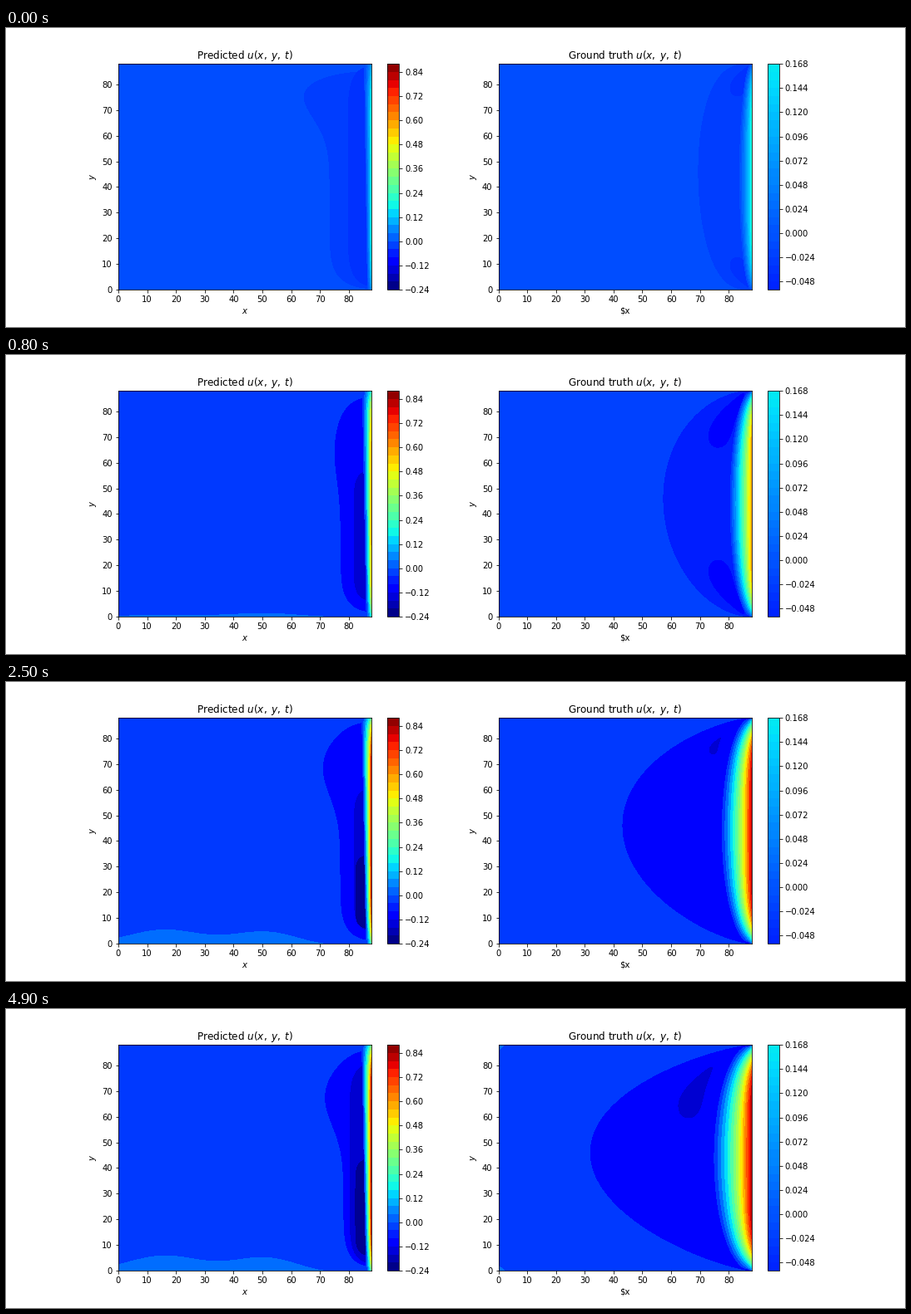
Recreate the animation shown at these times as a matplotlib script. Size 1080 by 360 pixels, loop 5000 ms.

```python
import matplotlib.pyplot as plt
import numpy as np
from matplotlib.animation import FuncAnimation
from matplotlib.colors import Normalize

FRAMES, INTERVAL = 50, 100
SIZE = 88
CMAP = plt.get_cmap("jet")
NORM = Normalize(-0.23, 0.88)
NICE_STEPS = (0.01, 0.015, 0.02, 0.03, 0.04, 0.06)

plt.rcParams["figure.subplot.bottom"] = 0.125
plt.rcParams["font.size"] = 10

# Key poses by time in ms.
# Pockets: bottom, top, width, then height and centre of a bulge.
OUTER = {0: (0.5, 85, 14.5, 11.5, 80), 500: (2.4, 85.5, 10.6, 1, 62),
         1200: (1.5, 85.3, 10.8, 3.6, 68), 2500: (1.5, 86.3, 10.8, 6.1, 69),
         3200: (1.5, 86.3, 10.8, 6.1, 69), 4000: (1.8, 85.8, 9.7, 6.5, 68)}
MIDDLE = {0: (1.5, 87, 8.2), 500: (5.5, 66, 6.3), 1200: (7.4, 45, 5.9),
          2500: (5.2, 60.5, 6.1), 3200: (5.2, 60.5, 6.1), 4000: (2.9, 80.6, 7.6)}
CORE = {1200: (6, 30, 0), 2500: (5.8, 34.6, 5.5), 4000: (5.8, 43.7, 5.6)}
HUMPS = {0: (0, 0), 1200: (0.8, 2), 2500: (5.3, 4.9), 4900: (5.7, 5.4)}
# Leaves: tip, tail, half width.
LENS = {0: (87, 87, 83, 75.5, 2.3), 500: (85, 87, 79, 73.5, 2.65),
        1200: (85.5, 87, 72.5, 56, 4.7)}
SPOT = {900: (79, 80, 79, 80, 0), 1200: (82, 85, 77.2, 75, 1.9),
        2500: (77, 80, 74.5, 74, 1.2), 4900: (74, 79.3, 66, 59.6, 3.6)}
BOWL_TIP = {0: 69.5, 500: 64, 1200: 48.5, 2500: 43.2, 4900: 32}

X, Y = np.meshgrid(np.linspace(66, SIZE, 89), np.linspace(0, SIZE, 89))
ETA = np.abs(Y / 44 - 1)


def blend(keys, t):
    """Linear interpolation between keyed values."""
    vals = np.transpose(list(keys.values()))
    if vals.ndim == 1:
        return np.interp(t, list(keys), vals)
    return [np.interp(t, list(keys), v) for v in vals]


def band_step(span):
    """Smallest round step that covers the span in 21 bands."""
    return next((s for s in NICE_STEPS if s >= span / 21), NICE_STEPS[-1])


def pocket(bottom, top, width, bulge=0, centre=44):
    """Region leaning on the right wall, rounded at both ends."""
    e = -np.cos(np.linspace(0, np.pi, 80))
    y = bottom + (top - bottom) * (e + 1) / 2
    w = width + bulge * np.exp(-(((y - centre) / 16) ** 2))
    return SIZE - w * np.sqrt(1 - e**8), y


def leaf(tip_x, tip_y, tail_x, tail_y, half):
    """Drop from tip to tail, bowed to the left."""
    a = np.linspace(0, 2 * np.pi, 60)
    k = (1 - np.cos(a)) / 2
    x = tip_x + (tail_x - tip_x) * k
    x += half * (np.sin(a) * (0.5 + k) - 0.6 * np.sin(np.pi * k))
    return x, tip_y + (tail_y - tip_y) * k


def bowl(tip, power):
    e = np.cos(np.linspace(0, np.pi, 120))
    return SIZE - (SIZE - tip) * (1 - e**2) ** power, 44 + 44 * e + 2 * (1 - e**2)


def ripple(first, second):
    x = np.linspace(0, 71, 80)
    y = first * np.exp(-(((x - 16) / 17) ** 2))
    y += second * np.exp(-(((x - 52) / 17) ** 2))
    return np.append(x, 0), np.append(y * (1 - (x / 71) ** 8), 0)


def region(ax, xy, value):
    artists.extend(ax.fill(*xy, color=CMAP(NORM(value)), lw=0,
                           antialiased=False, zorder=1))


def wall_layer(ax, depth, wall, step):
    """Bands rising from -step at the inner edge to the wall value."""
    s = 1 - (SIZE - X) / np.maximum(depth, 0.3)
    u = -step + (wall + step) * (0.7 * s + 0.3 * np.maximum(s, 0) ** 3)
    levels = step * np.arange(-1, np.ceil(wall.max() / step) + 2)
    artists.append(ax.contourf(X, Y, u, levels=levels, cmap=CMAP, norm=NORM,
                               zorder=1.5))


def draw_predicted(ax, t, speed):
    step = band_step(1.5 * speed)
    ax.set_facecolor(CMAP(NORM(-step / 2)))
    region(ax, ripple(*blend(HUMPS, t)), step / 2)
    for i, keys in enumerate((OUTER, MIDDLE, CORE)):
        region(ax, pocket(*blend(keys, t)), -(i + 1.5) * step)
    depth = (1 - 0.25 * np.exp(-t / 500)) * (1.9 + 1.5 * Y / SIZE)
    wall_layer(ax, depth, speed * (1 - 0.65 * ETA**6), step)


def draw_truth(ax, t, speed):
    step = band_step(1.2 * speed)
    ax.set_facecolor(CMAP(NORM(-step / 2)))
    power = 0.78 - 0.43 * np.exp(-t / 1500)
    region(ax, bowl(blend(BOWL_TIP, t), power), -1.5 * step)
    if step < NICE_STEPS[-1]:
        x, y = leaf(*blend(LENS, t))
        region(ax, (x, y), -2.5 * step)
        region(ax, (x, SIZE - y), -2.5 * step)
    region(ax, leaf(*blend(SPOT, t)), -0.12 - step / 2)
    n = max(0, 0.0007 * (t - 2000))
    region(ax, ([0, n, 0], [0, 0, n]), step / 2)
    region(ax, ([0, n, 0], [SIZE, SIZE, SIZE - n]), step / 2)
    depth = 4.2 + 8.8 * (t / 4900) ** 0.55
    wall_layer(ax, depth * np.sqrt(1 - ETA**2), speed * (1 - ETA**6), step)


def setup(ax, title, xlabel, levels, ticks):
    bands = ax.contourf([[levels[0], levels[-1]]] * 2, levels=levels,
                        cmap=CMAP, norm=NORM)
    fig.colorbar(bands, ax=ax, ticks=ticks)
    bands.set_visible(False)
    ax.set(title=title, xlabel=xlabel, ylabel="$y$",
           xlim=(0, SIZE), ylim=(0, SIZE))
    ax.set_autoscale_on(False)


def update(i):
    while artists:
        artists.pop().remove()
    t = i * INTERVAL
    speed = 0.84 - 0.65 * np.exp(-t / 850)
    draw_predicted(left, t, speed)
    draw_truth(right, t, speed)
    return []


artists = []
fig, (left, right) = plt.subplots(1, 2, figsize=(15, 5), dpi=72)
p_levels = np.round(-0.24 + 0.04 * np.arange(29), 3)
t_levels = np.round(-0.056 + 0.008 * np.arange(29), 3)
setup(left, r"Predicted $u(x,\;y,\;t)$", "$x$", p_levels, p_levels[::3])
setup(right, r"Ground truth $u(x,\;y,\;t)$", "$x", t_levels, t_levels[1::3])

anim = FuncAnimation(fig, update, frames=FRAMES, interval=INTERVAL,
                     init_func=lambda: update(0), repeat=True, repeat_delay=0)
plt.show()
```
